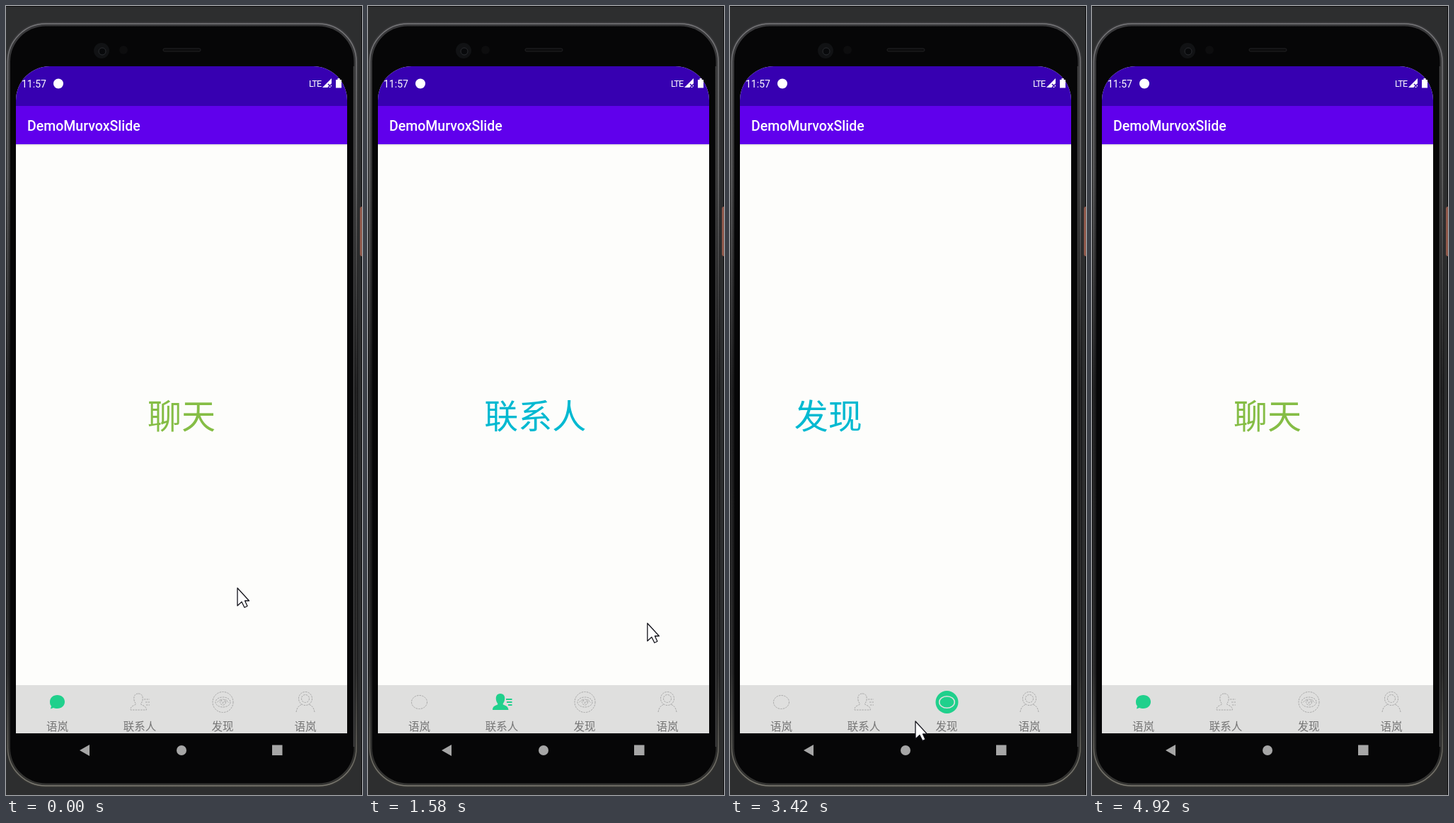
Write an HTML page that moves like this. It is 503 by 1113 pixels and loops after 5.01 s.

```html
<!DOCTYPE html>
<html lang="zh">
<head>
<meta charset="utf-8">
<title>Slide demo</title>
<style>
  html, body { margin: 0; width: 100%; height: 100%; overflow: hidden; background: #2d2e2f; }
  svg { display: block; width: 503px; height: 1113px; }
  text { font-family: "Noto Sans CJK SC", "Noto Sans CJK", sans-serif; }
  .ui { font-family: Roboto, sans-serif; fill: #fff; }
  .page { font-size: 48px; text-anchor: middle; }
  .label { font-size: 15.5px; text-anchor: middle; fill: #757575; }
  .tab .off { fill: none; stroke: #a8a8a8; stroke-width: 1; stroke-dasharray: 2.5 1.2; }
  .tab .on { display: none; fill: #20d08c; }
  .tab.active .on { display: inline; }
  .tab.active .off { display: none; }
  .line { fill: none; stroke: #20d08c; }
</style>
</head>
<body>
<svg viewBox="0 0 503 1113">
  <defs>
    <linearGradient id="bevel" x1="0" y1="0" x2="0" y2="1">
      <stop offset="0" stop-color="#38383a"/>
      <stop offset=".2" stop-color="#343435"/>
      <stop offset=".48" stop-color="#161617"/>
      <stop offset=".85" stop-color="#1c1c1d"/>
      <stop offset="1" stop-color="#353533"/>
    </linearGradient>
    <linearGradient id="rim" x1="0" y1="0" x2="0" y2="1">
      <stop offset="0" stop-color="#77777a"/>
      <stop offset=".2" stop-color="#6a6a6b"/>
      <stop offset=".48" stop-color="#29292a"/>
      <stop offset=".85" stop-color="#383838"/>
      <stop offset="1" stop-color="#7d7b72"/>
    </linearGradient>
    <linearGradient id="shade" x1="0" y1="0" x2="0" y2="1">
      <stop offset="0" stop-color="#000" stop-opacity=".12"/>
      <stop offset="1" stop-color="#000" stop-opacity="0"/>
    </linearGradient>
    <clipPath id="screen">
      <path d="M14 1026V133A48 48 0 0 1 62 85H434A48 48 0 0 1 482 133V1026Z"/>
    </clipPath>
    <path id="bust" d="M-2 -12C3 -12 5 -8 4 -3C3.500 0 2 1 1.500 3C4 5 9 5 9.500 11H-13C-13 5 -8 5 -5.500 3C-6 1 -7.500 0 -8 -3C-9 -8 -7 -12 -2 -12Z"/>
  </defs>

  <rect width="503" height="1113" fill="#2d2e2f"/>
  <path d="M0 .5H503M502.5 0V1113" stroke="#0c0c0d"/>

  <!-- handset -->
  <rect x="500" y="283" width="6" height="70" rx="3" fill="#8f594b"/>
  <rect x="0" y="22.500" width="497.500" height="1080" rx="56" fill="url(#bevel)"/>
  <rect x="2.500" y="25" width="492.500" height="1075" rx="53.500" fill="none" stroke="url(#rim)" stroke-width="1.500"/>
  <rect x="6" y="28.500" width="485.500" height="1068" rx="50" fill="#060607"/>
  <path d="M491.500 85V1045" stroke="#444445" stroke-width="1.500"/>
  <circle cx="135" cy="63" r="11" fill="#111214"/>
  <circle cx="136" cy="64" r="5" fill="#08090b" stroke="#2a2c30"/>
  <circle cx="166" cy="62" r="6" fill="#0d0d0e"/>
  <rect x="222" y="60" width="53" height="4" rx="2" fill="#0b0b0c" stroke="#222224"/>

  <!-- screen -->
  <g clip-path="url(#screen)">
    <rect x="14" y="85" width="468" height="941" fill="#fdfdfb"/>
    <g id="pages"></g>
    <rect x="14" y="85" width="468" height="56" fill="#3700b1"/>
    <rect x="14" y="141" width="468" height="54" fill="#6000ec"/>
    <rect x="14" y="195" width="468" height="3" fill="url(#shade)"/>
    <rect x="14" y="958" width="468" height="68" fill="#dfdfde"/>
  </g>
  <text class="ui" x="22" y="115" font-size="14">11:57</text>
  <circle cx="74" cy="109.5" r="7" fill="#fff"/>
  <text class="ui" x="428" y="114" font-size="12.5" letter-spacing="-.7">LTE</text>
  <path d="M460 102V115H447Z" fill="#fff"/>
  <path d="M455 110L460 115M460 110L455 115" stroke="#3700b1" stroke-width="1.4"/>
  <path d="M466 104H468.5V102H471.5V104H474V115.500H466Z" fill="#fff"/>
  <text class="ui" x="30" y="176" font-size="19.5" font-weight="500">DemoMurvoxSlide</text>

  <!-- tabs -->
  <g class="tab" transform="translate(72.5 982)">
    <ellipse class="off" rx="11" ry="9.500"/>
    <path class="on" d="M0 -10C6 -10 10.500 -6 10.500 -.5S6 9 0 9C-2 9 -4 8.600 -5.500 8L-9.500 9.500L-8.500 5.500C-10 4 -10.500 2 -10.500 -.5C-10.500 -6 -6 -10 0 -10Z"/>
  </g>
  <g class="tab" transform="translate(189 982)">
    <g class="off">
      <use href="#bust"/>
      <path d="M6 -4H14M8 0H14M9 4H14"/>
    </g>
    <g class="on">
      <use href="#bust"/>
      <path class="line" d="M6 -4H14.500M7 0H14.500M9 4H14.500" stroke-width="1.8"/>
    </g>
  </g>
  <g class="tab" transform="translate(306.5 982)">
    <g class="off">
      <circle r="14.500"/>
      <ellipse rx="10.500" ry="7"/>
      <circle r="4"/>
      <path d="M-8 0L-3 -4L0 2L4 -4L8 1"/>
    </g>
    <g class="on">
      <circle r="16"/>
      <ellipse rx="10.800" ry="8.200" stroke="#dfdfde" stroke-width="1.600"/>
    </g>
  </g>
  <g class="tab" transform="translate(423 982)">
    <g class="off">
      <circle cy="-5" r="9.500"/>
      <circle cy="-5" r="5.500"/>
      <path d="M-13 14C-12 8 -9 4 -4 3M13 14C12 8 9 4 4 3"/>
    </g>
    <g class="on">
      <circle class="line" cy="-5.500" r="8" stroke-width="6"/>
      <path class="line" d="M-12 16C-11.500 9 -9 5 -4 2.500M12 16C11.500 9 9 5 4 2.500" stroke-width="6"/>
    </g>
  </g>
  <g id="labels"></g>

  <!-- system keys -->
  <g fill="#a6a6a6">
    <path d="M104 1050L118 1042V1058Z"/>
    <circle cx="248" cy="1050" r="7"/>
    <rect x="376" y="1042.500" width="14.500" height="14.500"/>
  </g>

  <path id="cursor" d="M0 0V25L6 19.500L10 27.500L14 25.500L10.500 18H16.500Z"
        fill="#fff" stroke="#15151c" stroke-width="1.300" stroke-linejoin="round"/>
</svg>
<script>
  const LOOP = 5010, FRAMES = 60, STEP = 250 / 3;
  const CENTER = 248, WIDTH = 467;
  const SVG = "http://www.w3.org/2000/svg";

  const linear = u => u;
  const smooth = u => u * u * (3 - 2 * u);
  const settle = u => 1 - (1 - u) ** 5;

  // start, end, from page, to page, easing
  const scrolls = [
    [760, 989, 0, .19, linear],
    [989, 1289, .19, 1, settle],
    [1560, 1700, 1, 1.15, linear],
    [1700, 2000, 1.15, 2, settle],
    [2420, 2720, 2, 3, settle],
    [3341, 3641, 3, 2, settle],
    [3853, 4153, 2, 1, settle],
    [4330, 4630, 1, 0, settle]
  ];

  // time, selected tab
  const picks = [[0, 0], [989, 1], [1700, 2], [2420, 3], [3341, 2], [3853, 1], [4330, 0]];

  // time, x, y of the pointer tip
  const path = [
    [0, 327, 821], [760, 327, 821], [989, 239, 819], [1140, 239, 819],
    [1520, 400, 870], [1560, 400, 870], [1700, 330, 880], [2000, 330, 880],
    [2380, 424, 1005], [2750, 427, 1005], [2900, 427, 1005], [3290, 302, 1007],
    [3341, 298, 1008], [3417, 262, 1009], [3760, 191, 1002], [3917, 190, 1001],
    [4280, 74, 1004], [4380, 72, 1006], [4640, 60, 1116]
  ];

  const pageData = [["聊天", "#85bd45"], ["联系人", "#00b9d1"], ["发现", "#00b9d1"], ["我", "#ee4033"]];
  const labelData = [["语岚", 72.5], ["联系人", 189], ["发现", 306], ["语岚", 423]];

  const $ = id => document.getElementById(id);

  function addText(parent, words, attrs) {
    const el = document.createElementNS(SVG, "text");
    for (const key in attrs) el.setAttribute(key, attrs[key]);
    el.textContent = words;
    return parent.appendChild(el);
  }

  const pages = pageData.map(([words, fill]) =>
    addText($("pages"), words, { class: "page", y: 596, fill }));
  labelData.forEach(([words, x]) =>
    addText($("labels"), words, { class: "label", x, y: 1022 }));
  const tabs = document.querySelectorAll(".tab");

  function pageAt(t) {
    let pos = 0;
    for (const [start, end, from, to, ease] of scrolls) {
      if (t < start) break;
      pos = from + (to - from) * ease(Math.min(1, (t - start) / (end - start)));
    }
    return pos;
  }

  function pointerAt(t) {
    const i = path.findIndex(p => p[0] > t);
    if (i < 0) return path[path.length - 1].slice(1);
    const [t0, x0, y0] = path[i - 1], [t1, x1, y1] = path[i];
    const u = smooth((t - t0) / (t1 - t0));
    return [x0 + (x1 - x0) * u, y0 + (y1 - y0) * u];
  }

  function draw(t) {
    const pos = pageAt(t);
    pages.forEach((el, i) => el.setAttribute("x", CENTER + (i - pos) * WIDTH));
    const selected = picks.filter(p => p[0] <= t).pop()[1];
    tabs.forEach((el, i) => el.classList.toggle("active", i === selected));
    $("cursor").setAttribute("transform", `translate(${pointerAt(t).join(" ")})`);
  }

  const origin = performance.now();

  function tick(now) {
    const t = Math.max(0, now - origin) % LOOP;
    draw(Math.min(FRAMES - 1, Math.floor((t + 4) / STEP)) * STEP);
    requestAnimationFrame(tick);
  }

  draw(0);
  requestAnimationFrame(tick);
</script>
</body>
</html>
```
